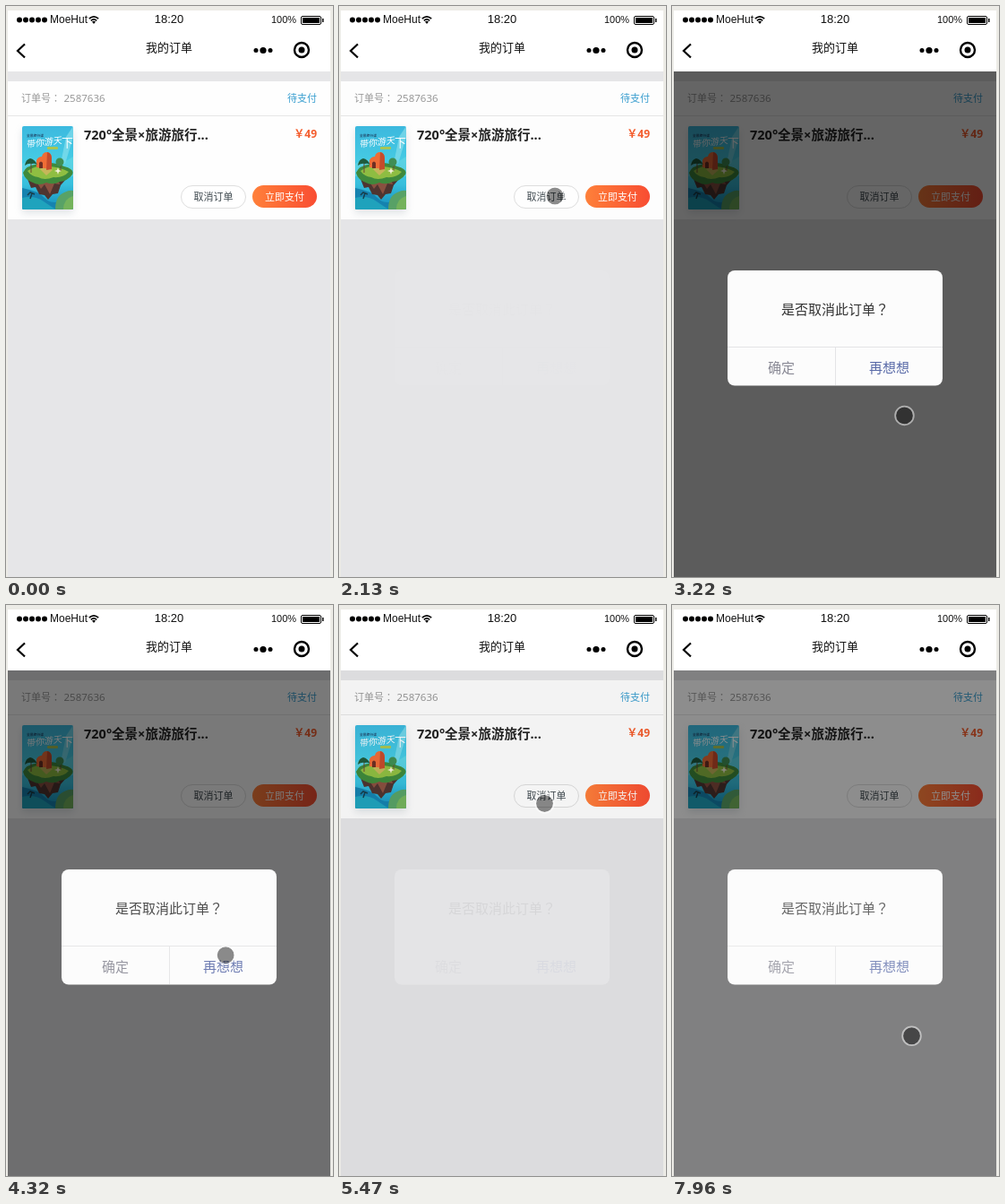
Animation of 365 by 637 pixels, one loop 8000 ms. Source, as an HTML page:

```html
<!DOCTYPE html>
<html lang="zh-CN">
<head>
<meta charset="utf-8">
<style>
html, body { margin: 0; width: 100%; height: 100%; overflow: hidden; background: #ecebe6; }
svg { display: block; font-family: "Noto Sans", "Noto Sans CJK SC", "Noto Sans CJK", sans-serif; font-size: 11px; }
.status { font-family: "Liberation Sans", sans-serif; font-size: 12px; fill: #111; }
.mark { font-family: "Noto Sans CJK TC", "Noto Sans CJK", sans-serif; }
.mid { text-anchor: middle; }
.end { text-anchor: end; }
.line { fill: none; stroke: #000; }
.big { font-size: 15px; }
</style>
</head>
<body>
<svg width="365" height="637" viewBox="0 0 365 637">
  <defs>
    <linearGradient id="pay"><stop stop-color="#ff803a"/><stop offset="1" stop-color="#f94d32"/></linearGradient>
    <linearGradient id="sky" x2="0" y2="1">
      <stop stop-color="#3cb9df"/><stop offset=".4" stop-color="#45cbe4"/>
      <stop offset=".7" stop-color="#37bfdd"/><stop offset="1" stop-color="#128cba"/>
    </linearGradient>
    <clipPath id="cover"><rect x="18" y="134" width="57" height="93" rx="2"/></clipPath>
    <filter id="blur" x="-30%" y="-30%" width="160%" height="160%"><feGaussianBlur stdDeviation="4"/></filter>
  </defs>

  <rect x="2" y="73" width="360" height="564" fill="#e6e6e8"/>

  <!-- order card -->
  <rect x="2" y="84" width="360" height="154" fill="#fefefe"/>
  <path d="M2 122.5H362" stroke="#e6e6e6"/>
  <g fill="#999">
    <text x="17" y="107">订单号<tspan class="mark" lang="zh-TW">：</tspan></text>
    <text x="64.5" y="107" font-size="11.5">2587636</text>
  </g>
  <text x="347" y="107" class="end" fill="#3a9fd0">待支付</text>
  <text x="87" y="149" font-size="14.5" font-weight="700" fill="#222">720°全景×旅游旅行...</text>
  <text x="347" y="147" class="end" font-size="12" font-weight="700" fill="#f45c2c">￥49</text>
  <rect x="195.5" y="200.5" width="72" height="25" rx="12.5" fill="#fff" stroke="#dedede"/>
  <text x="231.5" y="217" class="mid" fill="#3d474d">取消订单</text>
  <rect x="275" y="200" width="72" height="25" rx="12.5" fill="url(#pay)"/>
  <text x="311" y="217" class="mid" fill="#fff">立即支付</text>

  <!-- cover picture -->
  <rect x="18" y="138" width="57" height="93" fill="#8896a0" opacity=".25" filter="url(#blur)"/>
  <g clip-path="url(#cover)">
    <rect x="18" y="134" width="57" height="93" fill="url(#sky)"/>
    <path d="M75 134v12l-9 30h-5l6-30z" fill="#8fe3ee" opacity=".6"/>
    <path d="M18 176q12-8 26-2t31-6v22H18z" fill="#6fdbe6" opacity=".5"/>
    <path d="M18 203q18 3 26 12t31-2v14H18z" fill="#1583b0"/>
    <path d="M18 214q14-3 24 4t14 9H18z" fill="#1fa3bd"/>
    <path d="M55 227q0-15 10-19 6-3 10-2v21z" fill="#58a266"/>
    <path d="M64 227q0-12 11-15v15z" fill="#74b35c"/>
    <path d="M24 193l4 10 5-1 4 8 6 1 4 5 5-6 6-1 3-9 7-8z" fill="#4f3430"/>
    <path d="M34 196l5 8 4-5 6 11 5-12 6 1-2-6H33z" fill="#8a5040"/>
    <path d="M19 186q3-8 17-10 17-3 29 3 12 3 9 9-5 7-14 8-7 4-15 1-8 4-15 0-9-3-11-11z" fill="#3f8a3c"/>
    <path d="M24 184q11-8 25-5 12 1 21 6-6 7-17 6-10 4-17 0-8-1-12-7z" fill="#8fbe42"/>
    <path d="M38 182l6-3 8 4-7 6z" fill="#c6b65a"/>
    <path d="M34 180v-8q2-4 6-4 1-5 6-5 5 1 5 7v12z" fill="#ef6d36"/>
    <path d="M46 163q5 1 5 7v12l-6 1z" fill="#c64b2c"/>
    <path d="M37 181v-6q2-3 4 0v6z" fill="#6f3024"/>
    <path d="M28 186v-12M61 184v-9" stroke="#6a4a2e"/>
    <path d="M21 178q1-7 6-8 5 1 8 7-3-2-6-1-4-1-8 2z" fill="#1f5b3d"/>
    <circle cx="60" cy="174" r="4.5" fill="#3f8f55"/>
    <path d="M58 180l1 3 3 1-3 1-1 3-1-3-3-1 3-1z" fill="#f4f1d9"/>
    <path d="M24 211l3-3 5 2M29 209l-2 6" fill="none" stroke="#173f4d" stroke-width="1.5"/>
    <text x="23" y="146" font-size="3.8" font-weight="700" fill="#245477">全景旅行课</text>
    <g fill="#fff">
      <text transform="translate(23 158) rotate(-7) skewX(-9)" font-size="10">带你游天</text>
      <text x="62" y="157" font-size="13">下</text>
    </g>
    <rect x="46" y="157" width="12" height="3" rx="1" fill="#a9c653"/>
  </g>

  <!-- confirm dialog -->
  <rect id="shade" x="2" y="73" width="360" height="564"/>
  <rect id="panel" x="62" y="295" width="240" height="128.5" rx="8" fill="#fcfcfc"/>
  <g id="words">
    <path d="M62 380.5H302M182.5 381V423" stroke="#e4e4e6"/>
    <g class="big">
      <text x="122" y="344" fill="#333">是否取消此订单<tspan class="mark" lang="zh-TW">？</tspan></text>
      <text x="122" y="409" class="mid" fill="#888894">确定</text>
      <text x="242.5" y="409" class="mid" fill="#596aa8">再想想</text>
    </g>
  </g>

  <!-- status and title bars -->
  <rect x="2" y="5" width="360" height="68" fill="#fff"/>
  <path d="M15 15.5h28.1" stroke="#000" stroke-width="6" stroke-linecap="round" stroke-dasharray="0 7"/>
  <g class="status">
    <text x="49" y="19">MoeHut</text>
    <text x="182" y="19" class="mid" style="font-size:13px">18:20</text>
    <text x="296" y="19" style="font-size:11px">100%</text>
  </g>
  <path class="line" d="M92.8 14.2q5.2-4.6 10.4 0M94.8 16.3q3.2-2.8 6.4 0" stroke-width="1.7"/>
  <path d="M96 17.6q2-1.6 4 0l-2 2.4z"/>
  <rect class="line" x="329.5" y="11.5" width="22" height="9" rx="1.5"/>
  <path d="M331 13h19v6h-19zM353 14h1.5v4H353z"/>
  <text x="182" y="51" class="mid" style="font-size:13px" fill="#111">我的订单</text>
  <path class="line" d="M21 42.5L13 50L21 57.5" stroke-width="2.2"/>
  <circle cx="279" cy="49.5" r="2.5"/><circle cx="287" cy="49.5" r="3.6"/><circle cx="295" cy="49.5" r="2.5"/>
  <circle class="line" cx="330" cy="49" r="8" stroke-width="2.4"/><circle cx="330" cy="49" r="3.5"/>

  <g id="cursor">
    <circle r="9.5" opacity=".45"/>
    <circle r="10.3" fill="none" stroke="#fff" stroke-width="1.8" opacity=".5"/>
  </g>
</svg>
<script>
const LOOP = 8000;
// time, x, y
const path = [
  [70, 278, 632], [270, 278, 632], [430, 322, 540], [560, 312, 460], [660, 287, 414],
  [830, 265, 410], [990, 232, 400], [1210, 236, 350], [1520, 243, 225], [1670, 241, 212],
  [2250, 241, 212], [2550, 254, 355], [2900, 269, 513], [3220, 259.5, 457], [3780, 246, 429],
  [4000, 243, 405], [4250, 244, 402], [4700, 251.5, 330], [5470, 229.5, 221.5],
  [5800, 230.5, 214], [7280, 230.5, 214], [7600, 247, 340], [7960, 267.5, 480.5], [8000, 268, 490]
];
const $ = id => document.getElementById(id);
const swing = (t, start, length) => {
  const p = Math.min(1, Math.max(0, (t - start) / length));
  return (1 - Math.cos(Math.PI * p)) / 2;
};

function moveCursor(t) {
  $('cursor').style.display = t < path[0][0] ? 'none' : '';
  const i = Math.max(1, path.findIndex(k => k[0] > t));
  const [a, x, y] = path[i - 1], [b, x2, y2] = path[i];
  const p = (t - a) / (b - a);
  $('cursor').setAttribute('transform', `translate(${x + (x2 - x) * p} ${y + (y2 - y) * p})`);
}

function draw(t) {
  const s = swing(t, 2075, 1180) - swing(t, 3870, 1940) + swing(t, 7180, 1180);
  $('shade').style.opacity = 0.6 * s;
  $('panel').style.opacity = 1 - (1 - s) ** 4; // four stacked sheets fade together
  $('words').style.opacity = s;
  moveCursor(t);
}

function tick() {
  draw(performance.now() % LOOP);
  requestAnimationFrame(tick);
}
tick();
</script>
</body>
</html>
```
